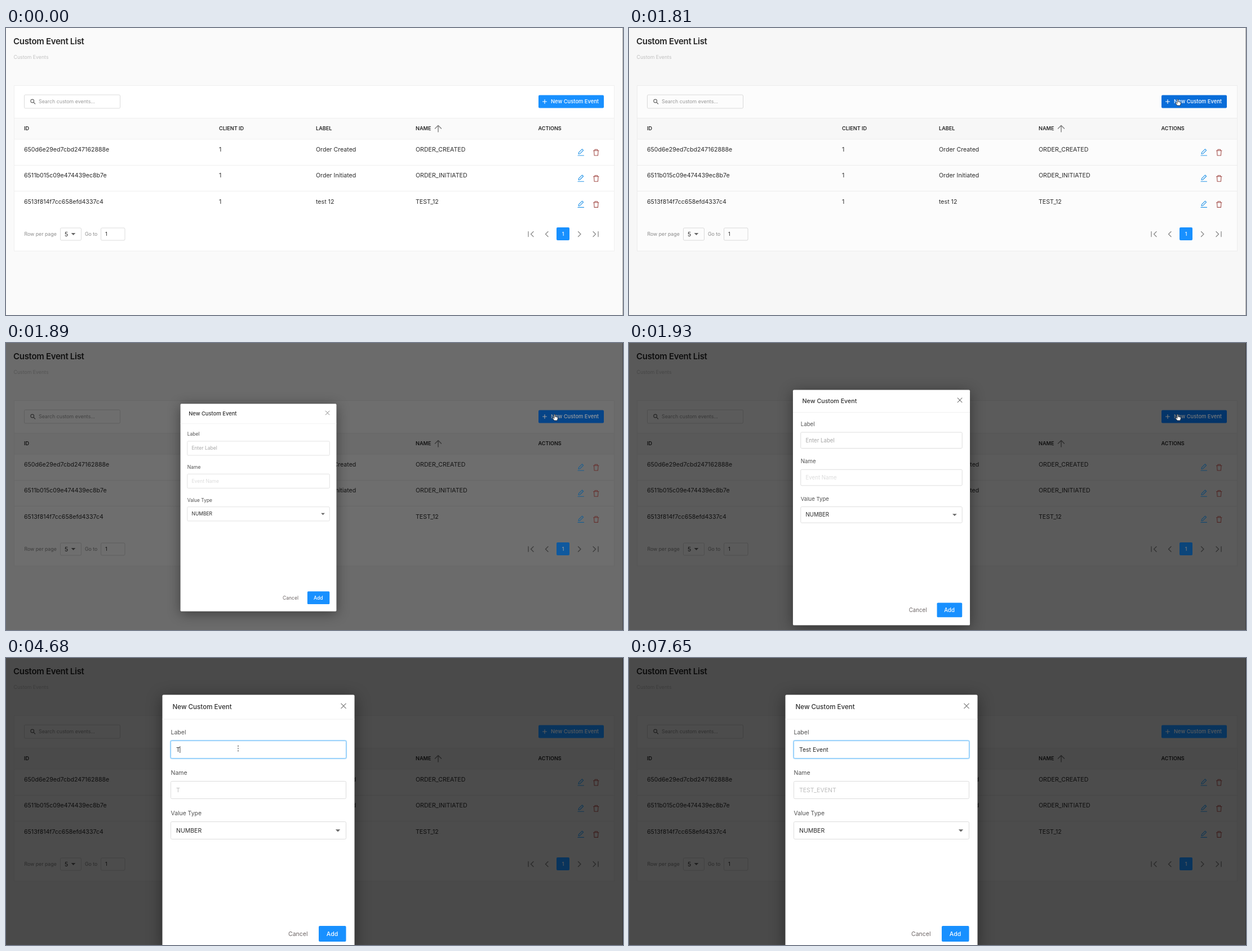
Recreate the animation shown at these times as an HTML page. Size 1095 by 511 pixels, loop 8000 ms.

```html
<!DOCTYPE html>
<html lang="en">
<head>
<meta charset="utf-8">
<title>Custom Event List</title>
<style>
  html, body { margin: 0; width: 100%; height: 100%; overflow: hidden; background: #fafafa; }
  svg { display: block; position: fixed; left: 0; top: 0; }
  text { font-family: Inter, "Open Sans", sans-serif; white-space: pre; }
  .line { fill: none; stroke-linecap: round; stroke-linejoin: round; }
  #sheet { filter: drop-shadow(0 5px 14px rgba(0, 0, 0, .42)); }
</style>
</head>
<body>
<svg id="stage" width="1095" height="511" viewBox="0 0 1095 511"></svg>
<script>
const LOOP = 8000, BLUE = '#1890ff', DARK = '#2b2b2b', GREY = '#8c8c8c';

// Markup helpers; text is centred vertically on y
const text = (x, y, s, size = 10.5, fill = DARK, weight = 400, more = '') =>
  `<text x="${x}" y="${y + size * .36}" font-size="${size}" fill="${fill}" font-weight="${weight}" ${more}>${s}</text>`;
const rect = (x, y, w, h, fill, more = '') =>
  `<rect x="${x}" y="${y}" width="${w}" height="${h}" fill="${fill}" ${more}/>`;
const line = (d, stroke, width = 1, more = '') =>
  `<path class="line" d="${d}" stroke="${stroke}" stroke-width="${width}" ${more}/>`;
const field = (x, y, w, h, more = '') =>
  rect(x, y, w, h, '#fff', `rx="2" stroke="#dcdcdc" ${more}`);
const triangle = (x, y, r) =>
  `<path d="M${x - r} ${y - r / 2}h${2 * r}l${-r} ${r}z" fill="#666"/>`;

const rows = [
  ['650d6e29ed7cbd247162888e', 'Order Created', 'ORDER_CREATED'],
  ['6511b015c09e474439ec8b7e', 'Order Initiated', 'ORDER_INITIATED'],
  ['6513f814f7cc658efd4337c4', 'test 12', 'TEST_12']
];
const rowY = i => 216.4 + 46.2 * i;

const heads = [[32, 'ID'], [378, 'CLIENT ID'], [550, 'LABEL'], [727, 'NAME'], [944.5, 'ACTIONS']];

const page = [
  rect(0, 0, 1095, 511, '#fafafa'),
  text(13, 24, 'Custom Event List', 15, '#262626', 600, 'letter-spacing="-.3"'),
  text(13.5, 51.5, 'Custom Events', 8.75, '#c2c2c2'),
  rect(14.5, 102.5, 1065, 294.5, '#fff', 'stroke="#f0f0f0"'),
  field(32.5, 119, 170, 24),
  '<circle cx="46.7" cy="130" r="2.9" fill="none" stroke="#666" stroke-width="1.1"/>',
  line('M49 132.4l2.6 2.6', '#666', 1.2),
  text(58, 131, 'Search custom events...', 8.8, '#999'),
  rect(15, 160, 1064, 38, '#fafafa'),
  line('M15 160.5H1079M15 198H1079M15 244.5H1079M15 290.5H1079', '#efefef'),
  ...heads.map(([x, s]) => text(x, 178.7, s, 9.1, '#262626', 600)),
  line('M767 185V173.5M761.5 179l5.5-5.5 5.5 5.5', '#808080', 1.4),
  ...rows.map(([id, label, name], i) =>
    [[32, id], [378, '1'], [550, label], [727, name]].map(([x, s]) => text(x, rowY(i), s, 10.6)).join('')),
  text(32.5, 367, 'Row per page', 8.75, GREY),
  field(96.5, 356, 37, 22),
  text(104, 367, '5'),
  triangle(119.5, 367, 3.8),
  text(140, 367, 'Go to', 8.75, GREY),
  field(168.5, 356, 42.5, 22),
  text(176, 367, '1', 9.5),
  line('M927 362.5v9M936 362.5l-4.5 4.5 4.5 4.5M962 362.5l-4.5 4.5 4.5 4.5' +
       'M1015.5 362.5l4.5 4.5-4.5 4.5M1042 362.5l4.5 4.5-4.5 4.5M1051 362.5v9', GREY, 1.3),
  line('M1094.5 0V511', '#a8a8a8')
].join('');

const icons = y =>
  line(`M1015 ${y + 5.5}h10.5M1016 ${y + 2.8}l.5-2.6 6-6 2.1 2.1-6 6z`, '#2a97e8', 1.1) +
  line(`M1042.5 ${y - 3.2}h9.5M1045 ${y - 3.2}v-2h4.5v2M1043.5 ${y - 3.2}l.6 8.7h6.3l.6-8.7`, '#a5514d', 1.1);

const accents = [
  rect(945, 119.5, 116, 23, BLUE, 'id="newBtn" rx="2"'),
  line('M952.5 131h7M956 127.5v7', '#fff', 1.1),
  text(967, 131, 'New Custom Event', 9.4, '#fff', 500),
  ...rows.map((_, i) => icons(rowY(i) + 5.1)),
  rect(977, 355, 23, 23, BLUE, 'rx="2"'),
  text(988.5, 367, '1', 8.75, '#fff', 500, 'text-anchor="middle"')
].join('');

const modal = [
  rect(277.5, 65.5, 341, 455, '#fff', 'id="sheet" rx="2"'),
  text(295.5, 87, 'New Custom Event', 11.6, '#303030', 500),
  line('M594.8 81.2l8.4 8.4M603.2 81.2l-8.4 8.4', '#777', 1.1),
  line('M278 109H618', '#f0f0f0'),
  text(292.5, 132, 'Label', 10.5, '#505050'),
  rect(291.8, 146.8, 312.4, 32.4, 'none', 'id="glow" rx="3" stroke="#b5defc" stroke-width="2"'),
  field(292.5, 147.5, 311, 31, 'id="labelBox"'),
  text(302, 163, '', 10.5, DARK, 400, 'id="label"'),
  rect(0, 157, 1, 12, '#444', 'id="caret"'),
  text(292.5, 204, 'Name', 10.5, '#505050'),
  field(292.5, 219.5, 311, 31),
  text(302, 235, '', 10.5, DARK, 400, 'id="name"'),
  text(292.5, 276.5, 'Value Type', 10.4, '#505050'),
  field(292.5, 291.5, 311, 31),
  text(302, 307, 'NUMBER'),
  triangle(589, 307.3, 4.2),
  text(501, 491, 'Cancel', 10.5, '#6b6464'),
  rect(555, 477, 48.5, 28, BLUE, 'rx="2"'),
  text(579, 491, 'Add', 10.5, '#fff', 500, 'text-anchor="middle"')
].join('');

// Pointer shapes, hot spot at 0,0
const pointers =
  `<path id="arrow" d="M0 0V10l2.4-2.1 1.7 3.7 1.7-.8-1.6-3.5h3.3z" fill="#111" stroke="#fff" stroke-width=".9"/>` +
  `<path id="hand" d="M0 .6Q1-.4 1.8 .6V4.2L5.6 5Q6.6 5.4 6.4 7L5.4 11H.2L-3 7.2Q-3.2 5.8-1.8 6L0 7.3z" fill="#fff" stroke="#222" stroke-width=".8"/>` +
  line('M0-5v1.5M0-.7v1.4M0 3.5V5', '#666', 1.3, 'id="beam"');

const stage = document.getElementById('stage');
stage.innerHTML = page + rect(0, 0, 1095, 511, '#000', 'id="dim"') +
  `<g id="accents">${accents}</g><g id="modal">${modal}</g><g id="pointer">${pointers}</g>`;
const el = {};
stage.querySelectorAll('[id]').forEach(n => el[n.id] = n);
const set = (id, attrs) => { for (const k in attrs) el[id].setAttribute(k, attrs[k]); };
const show = (id, on) => el[id].style.display = on ? '' : 'none';
const clamp = v => Math.min(1, Math.max(0, v));

// Pointer stops: time, x, y, ease-out power of the way there
const stops = [
  [370, 720, 512, 1], [1170, 886, 162, 1], [1570, 973, 127, 2], [2300, 973, 127, 1],
  [2610, 908, 140, 1], [3010, 806, 180, 1], [3220, 640, 186, 1], [3450, 412, 161, 2]
];
function pointerAt(t) {
  const i = stops.findIndex(s => s[0] > t);
  if (i < 0) return stops[stops.length - 1].slice(1, 3);
  if (i === 0) return stops[0].slice(1, 3);
  const a = stops[i - 1], b = stops[i];
  const p = 1 - (1 - (t - a[0]) / (b[0] - a[0])) ** b[3];
  return [a[1] + (b[1] - a[1]) * p, a[2] + (b[2] - a[2]) * p];
}

const typed = 'Test Event';
const keys = [4680, 4840, 5080, 5200, 5610, 6140, 6260, 6500, 6990, 7110];

function draw(t) {
  // Movement runs at 25 pictures a second
  const step = Math.floor((t - 10) / 40) * 40 + 10;

  // Dialog zooms in while the page darkens
  const open = step >= 1850;
  const zoom = !open ? 0 : step > 2200 ? 1 : 1 - .449 * Math.exp((1850 - step) / 46);
  show('modal', open);
  set('modal', { transform: `translate(448 292.8) scale(${zoom}) translate(-448 -292.8)` });
  set('dim', { opacity: open ? .7 * zoom : step >= 1810 ? .012 : 0 });
  el.accents.style.filter = `brightness(${1 - .64 * zoom ** 2.5})`;

  // Pointer and hover
  const [x, y] = pointerAt(step);
  const onButton = step < 2300 && x > 945 && y < 142;
  const onField = step > 3010 && x < 603 && y < 178;
  show('pointer', t >= 370 && t < 5690);
  show('arrow', !onButton && !onField);
  show('hand', onButton);
  show('beam', onField);
  set('pointer', { transform: `translate(${x} ${y})` });
  set('newBtn', { fill: onButton ? '#096dd9' : BLUE });

  // Focus and typing
  const count = keys.filter(k => k <= t).length;
  const value = typed.slice(0, count);
  const last = count ? keys[count - 1] : 3690;
  set('glow', { opacity: clamp((step - 3450) / 240) });
  set('labelBox', { stroke: onField ? '#84c8f9' : '#dcdcdc' });
  el.label.textContent = value || 'Enter Label';
  set('label', { fill: value ? DARK : '#a6a6a6' });
  el.name.textContent = value.trim().toUpperCase().replace(' ', '_') || 'Event Name';
  set('name', { fill: value ? '#bcbcbc' : '#dcdcdc' });
  show('caret', t >= 3490 && t < last + 540);
  set('caret', { x: value ? 301.5 + el.label.getComputedTextLength() : 301 });
}

function tick() {
  draw(performance.now() % LOOP);
  requestAnimationFrame(tick);
}
tick();
</script>
</body>
</html>
```
